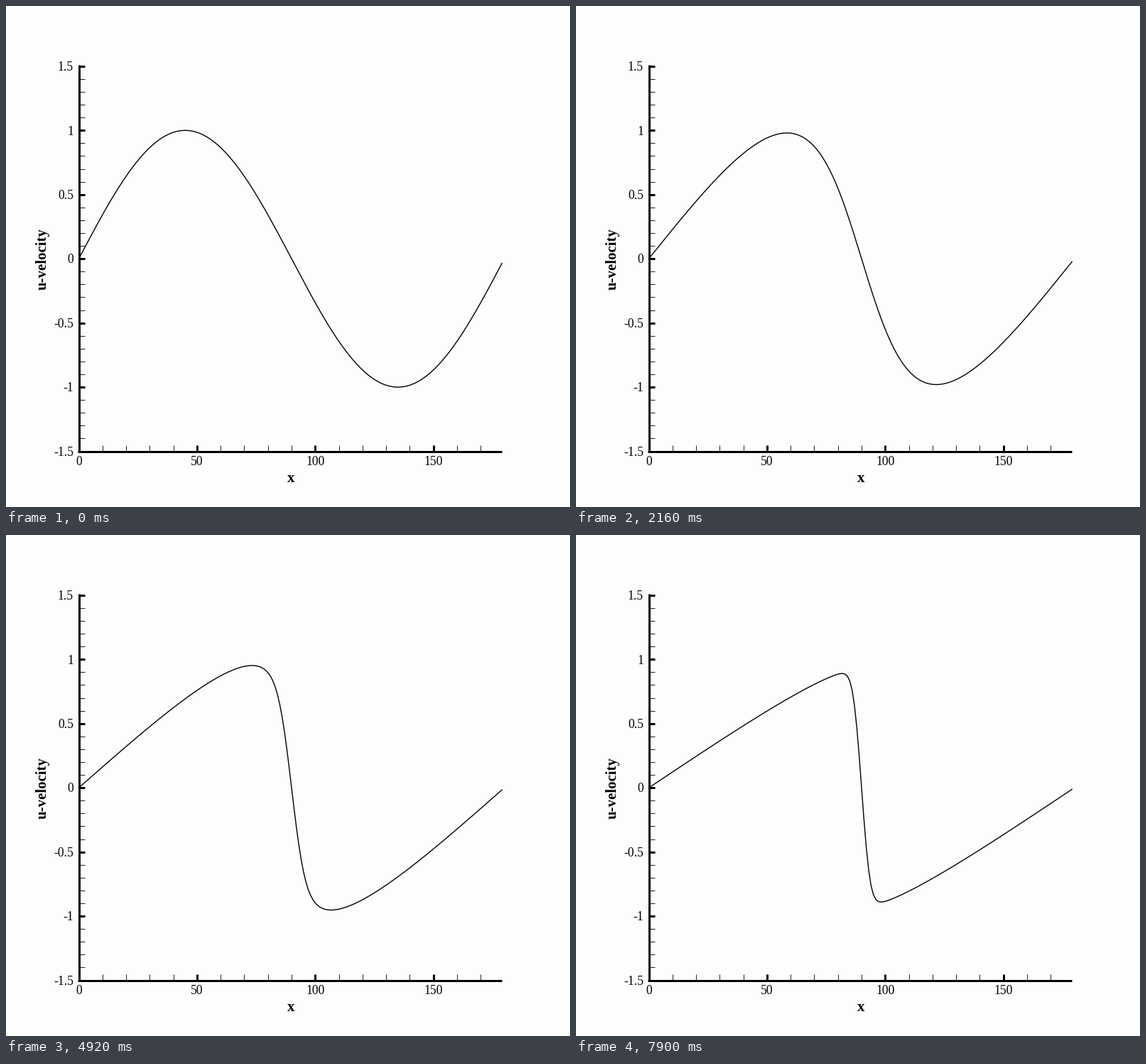
Recreate the animation shown at these times as a matplotlib script. Size 794 px wide and 706 px high, loop 8000 ms.

```python
import numpy as np
import matplotlib.pyplot as plt
from matplotlib.animation import FuncAnimation
from matplotlib.collections import LineCollection

W, H, DPI = 794, 706, 64
STEP_MS, LOOP_MS = 20, 8000
INK = "black"

X0, Y0 = 102.5, 356.2        # pixel position of the data point (0, 0)
SX, SY = 3.328, 180.9        # pixels per unit

N = 180                      # periodic grid, unit spacing
STATES = 88
STATE_TIME = 0.583           # model time between two shown states
SUBSTEPS = 6


def px(x):
    return X0 + SX * x


def py(u):
    return Y0 - SY * u


def rate(u):
    """Burgers equation in flux form, viscosity lower at high speed."""
    nxt = np.roll(u, -1)
    mid = (u + nxt) / 2
    flux = (u ** 2 + nxt ** 2) / 4 - (1.65 - 0.5 * mid ** 2) * (nxt - u)
    return np.roll(flux, 1) - flux


def solve():
    u = np.sin(2 * np.pi * np.arange(N) / N)
    dt = STATE_TIME / SUBSTEPS
    out = [u]
    for _ in range(STATES - 1):
        for _ in range(SUBSTEPS):
            k1 = rate(u)
            k2 = rate(u + dt * k1)
            u = u + dt * (k1 + k2) / 2
        out.append(u)
    return out


# The states change in a rhythm of nine per 820 ms.
BEATS = [0, 100, 200, 220, 320, 420, 520, 620, 720]


def state_at(ms):
    if ms < 100:
        return 0
    cycle, rest = divmod(ms - 100, 820)
    return min(9 * cycle + int(np.searchsorted(BEATS, rest, side="right")), STATES - 1)


def pt(pixels):
    return pixels * 72 / DPI


fig = plt.figure(figsize=(W / DPI, H / DPI), dpi=DPI, facecolor="#fdfdfc")
ax = fig.add_axes([0, 0, 1, 1])
ax.set_xlim(0, W)
ax.set_ylim(H, 0)
ax.axis("off")


def lines(segments, width, color=INK):
    ax.add_collection(LineCollection(segments, linewidths=pt(width), colors=color,
                                     capstyle="butt", zorder=2))


def label(x, y, text, size=17.6, **kw):
    ax.text(x, y, text, fontsize=pt(size), family="Liberation Serif", color=INK,
            va="baseline", **kw)


left, right = X0, px(179)
top, bottom = py(1.5), py(-1.5)
tick = 8.8

minor = [[(left, py(i / 10)), (left + tick, py(i / 10))] for i in range(-15, 16) if i % 5]
minor += [[(px(i), bottom), (px(i), bottom - tick)] for i in range(10, 180, 10) if i % 50]
lines(minor, 1, "#222222")

major = [[(left, py(i / 2)), (left + tick, py(i / 2))] for i in range(-3, 4)]
major += [[(px(i), bottom), (px(i), bottom - tick)] for i in (50, 100, 150)]
lines(major, 3)
lines([[(left, top - 1.5), (left, bottom + 1.5)],
       [(left - 1.5, bottom), (right, bottom)]], 3)

for i in range(-3, 4):
    label(95, py(i / 2) + 6.2, f"{i / 2:g}", ha="right")
for i in (0, 50, 100, 150):
    label(px(i) + 0.2, 647.2, str(i), ha="center")
label(401, 670.8, "x", 21, weight="bold", ha="center")
label(56.3, 356.1, "u-velocity", 20.9, weight="bold", ha="center",
      rotation=90, rotation_mode="anchor")

states = solve()
xs = px(np.arange(N))
curve, = ax.plot(xs, py(states[0]), color=INK, lw=pt(1.4), zorder=3)


def draw(i):
    curve.set_ydata(py(states[state_at(i * STEP_MS)]))
    return curve,


anim = FuncAnimation(fig, draw, frames=LOOP_MS // STEP_MS, interval=STEP_MS,
                     init_func=lambda: draw(0), repeat=True, repeat_delay=0)
plt.show()
```
